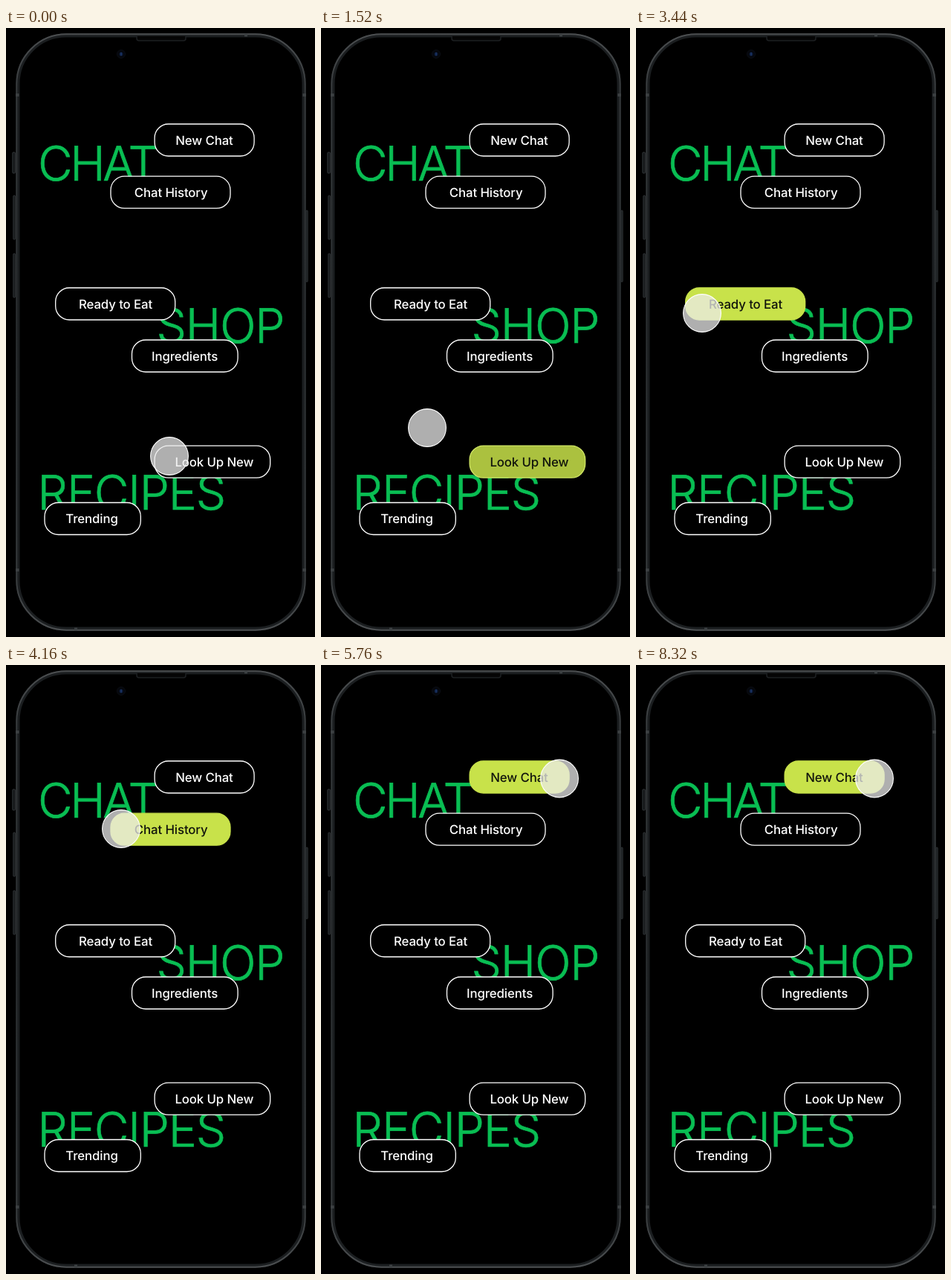
Animation of 416 by 818 pixels, one loop 8400 ms. Source, as an HTML page:

```html
<!DOCTYPE html>
<html lang="en">
<head>
<meta charset="utf-8">
<title>Menu hover</title>
<style>
  html, body { margin: 0; width: 100%; height: 100%; overflow: hidden; background: #000; }
  svg { display: block; width: 416px; height: 818px; }
  text { font-family: Inter, "Liberation Sans", sans-serif; text-rendering: geometricPrecision; }
  .heading {
    font-size: 64px; font-weight: 300; font-optical-sizing: none;
    fill: #09be53; stroke: #09be53; stroke-width: .7px;
  }
  .label { font-size: 16.8px; font-weight: 500; letter-spacing: -.1px; text-anchor: middle; }
</style>
</head>
<body>
<svg id="stage" viewBox="0 0 416 818">
  <defs>
    <linearGradient id="metal" x2="0" y2="1">
      <stop offset="0" stop-color="#4b4e50"/>
      <stop offset=".1" stop-color="#35393b"/>
      <stop offset=".5" stop-color="#292d2f"/>
      <stop offset=".9" stop-color="#35393b"/>
      <stop offset="1" stop-color="#4b4e50"/>
    </linearGradient>
  </defs>
  <rect width="416" height="818"/>
  <g id="phone" fill="none">
    <g fill="#15181a" stroke="#3a3f42" stroke-width=".8">
      <rect x="8.8" y="167" width="3.6" height="28" rx="1"/>
      <rect x="9.8" y="225" width="2.6" height="59" rx="1"/>
      <rect x="9.8" y="303" width="2.6" height="59" rx="1"/>
      <rect x="404" y="245" width="2.2" height="96" rx="1"/>
    </g>
    <rect x="16" y="10" width="385" height="797" rx="65" stroke="#1b1e20" stroke-width="5"/>
    <rect x="14.3" y="8.3" width="388.4" height="800.4" rx="67" stroke="url(#metal)" stroke-width="2"/>
    <path d="M13 90h4.5M399.5 90h4.5M13 728h4.5M399.5 728h4.5M323 7.5v4M94 805.5v4" stroke="#3c4042" stroke-width="4"/>
    <path d="M176 11v3q0 3 3 3h60q3 0 3-3v-3" fill="#050505" stroke="#1d2022" stroke-width="1.5"/>
    <circle cx="155" cy="35" r="5.5" fill="#05070c" stroke="#0b0e15"/>
    <circle cx="155" cy="35" r="2.6" fill="#0c1b3a"/>
    <path d="M155 32.8v4.4" stroke="#254783" stroke-width="1"/>
  </g>
  <g id="headings">
    <text class="heading" x="43" y="205" letter-spacing="-3.4">CHAT</text>
    <text class="heading" x="202.5" y="422.7" letter-spacing="-1.2">SHOP</text>
    <text class="heading" x="42.5" y="646.6" letter-spacing="-1.2">RECIPES</text>
  </g>
  <g id="buttons"></g>
  <circle id="touch" r="25.4" fill="#ececec" fill-opacity=".74" stroke="#fff" stroke-width="1.1"/>
</svg>
<script>
const LOOP = 8400, STEP = 80, FADE = 300;
const BLACK = [0, 0, 0], WHITE = [255, 255, 255], LIME = [200, 226, 74], INK = [17, 20, 12];

// lit: when the highlight starts to fade in and out
const buttons = [
  { label: 'New Chat', x: 200.1, y: 129, w: 134, textX: 267, lit: [5280, 9000] },
  { label: 'Chat History', x: 141, y: 199.2, w: 161, textX: 222.2, lit: [3840, 4440] },
  { label: 'Ready to Eat', x: 66.7, y: 349, w: 161, textX: 147.5, lit: [2030, 3480] },
  { label: 'Ingredients', x: 169.5, y: 419, w: 142.6, textX: 240.5 },
  { label: 'Look Up New', x: 200.1, y: 561.1, w: 155.6, textX: 280.4, lit: [20, 1448] },
  { label: 'Trending', x: 52, y: 637.5, w: 129.3, textX: 115.5 },
];

// time, x, y of the touch point
const path = [
  [0, 220, 575], [1120, 220, 575], [1520, 143, 537], [1800, 62, 455], [2320, 89, 383],
  [3480, 89, 383], [4120, 155, 220], [4480, 155, 220], [4920, 345, 164],
  [5200, 345, 164], [5600, 321, 152.5], [LOOP, 321, 152.5],
];

function add(parent, tag, attrs) {
  const node = document.createElementNS('http://www.w3.org/2000/svg', tag);
  for (const key in attrs) node.setAttribute(key, attrs[key]);
  return parent.appendChild(node);
}

const layer = document.getElementById('buttons');
const touch = document.getElementById('touch');
for (const b of buttons) {
  b.box = add(layer, 'rect', { x: b.x, y: b.y, width: b.w, height: 43, rx: 18.5, 'stroke-width': 1.3 });
  b.text = add(layer, 'text', { class: 'label', x: b.textX, y: b.y + 27.6 });
  b.text.textContent = b.label;
}

const smooth = u => {
  u = Math.min(1, Math.max(0, u));
  return u * u * (3 - 2 * u);
};
const mix = (a, b, k) => `rgb(${a.map((v, i) => Math.round(v + (b[i] - v) * k))})`;

// Zero at ends, holds and turning points, so the curve never overshoots
function slope(i, axis) {
  if (i === 0 || i === path.length - 1) return 0;
  const [before, here, after] = [path[i - 1], path[i], path[i + 1]];
  if ((here[axis] - before[axis]) * (after[axis] - here[axis]) <= 0) return 0;
  return (after[axis] - before[axis]) / (after[0] - before[0]);
}

function position(t, axis) {
  const i = Math.max(0, path.findIndex(p => p[0] > t) - 1);
  const a = path[i], b = path[i + 1], span = b[0] - a[0], u = (t - a[0]) / span;
  const s = smooth(u);
  return a[axis] * (1 - s) + b[axis] * s
    + span * u * (1 - u) * ((1 - u) * slope(i, axis) - u * slope(i + 1, axis));
}

function draw(time) {
  const t = Math.floor(time % LOOP / STEP) * STEP;
  for (const { box, text, lit } of buttons) {
    const k = lit ? smooth((t - lit[0]) / FADE) - smooth((t - lit[1]) / FADE) : 0;
    box.setAttribute('fill', mix(BLACK, LIME, k));
    box.setAttribute('stroke', mix(WHITE, LIME, k));
    // The label darkens ahead of the box to stay readable
    text.setAttribute('fill', mix(WHITE, INK, smooth(k * 1.25)));
  }
  touch.setAttribute('cx', position(t, 1));
  touch.setAttribute('cy', position(t, 2));
}

const start = performance.now();
function frame() {
  draw(performance.now() - start);
  requestAnimationFrame(frame);
}
frame();
</script>
</body>
</html>
```
